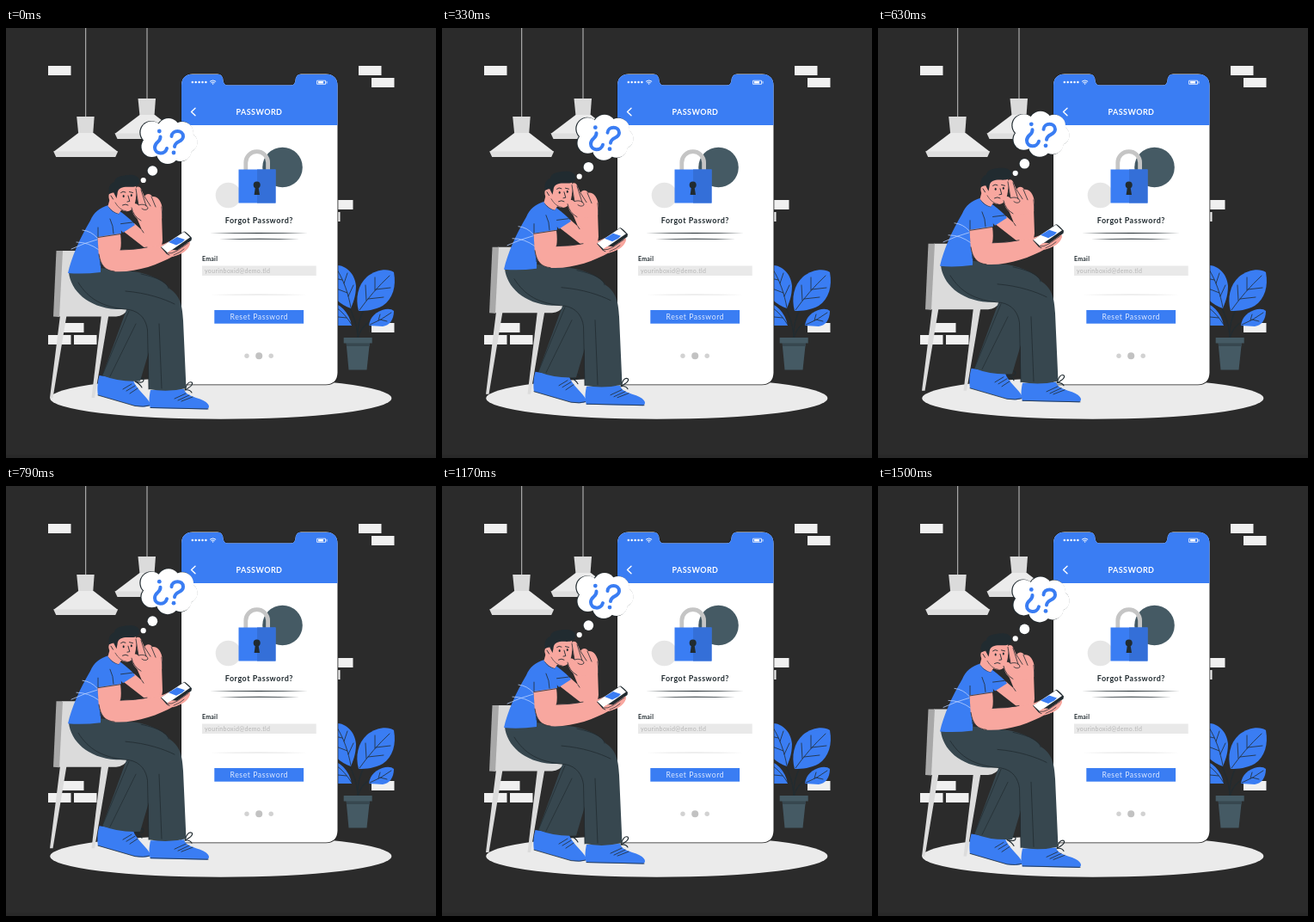
Animation, 500 px wide and 500 px high, one loop 1.54 s. Source, as an HTML page with a canvas:

```html
<!DOCTYPE html>
<html lang="en">
<head>
<meta charset="utf-8">
<title>Forgot password</title>
<style>
html, body { margin: 0; width: 100%; height: 100%; overflow: hidden; background: #2b2b2b; }
canvas { display: block; width: 500px; height: 500px; }
</style>
</head>
<body>
<canvas id="stage"></canvas>
<script>
const LOOP = 1540, LIFT = 10, LEAD = 35;
const BG = '#2b2b2b', BLUE = '#3a7df3', INK = '#212b30', SLATE = '#37474f',
  STEEL = '#455a64', SKIN = '#f8a79f', PALE = '#ebebeb', WHITE = '#fff';

const canvas = document.getElementById('stage');
const ctx = canvas.getContext('2d');
const ratio = window.devicePixelRatio || 1;
canvas.width = canvas.height = 500 * ratio;

function fill(d, color) {
  ctx.fillStyle = color;
  ctx.fill(new Path2D(d));
}
function line(d, color = INK, width = 0.8) {
  ctx.strokeStyle = color;
  ctx.lineWidth = width;
  ctx.stroke(new Path2D(d));
}
function rect(x, y, w, h, color) {
  ctx.fillStyle = color;
  ctx.fillRect(x, y, w, h);
}
function oval(x, y, rx, ry, color, turn = 0) {
  ctx.fillStyle = color;
  ctx.beginPath();
  ctx.ellipse(x, y, rx, ry, turn, 0, 7);
  ctx.fill();
}
const dot = (x, y, r, color) => oval(x, y, r, r, color);

function label(text, x, y, font, color, spacing, align = 'left') {
  ctx.font = font + ' Lato, sans-serif';
  ctx.letterSpacing = spacing + 'px';
  ctx.textAlign = align;
  ctx.fillStyle = color;
  ctx.fillText(text, x, y);
}

function lamp(x, y) {
  ctx.save();
  ctx.translate(x, y);
  line(`M0 ${-y}V0`, '#c4c4c4', 1);
  fill('M-10.5 0H10L8.5 20H-8.5Z', '#dbdbdb');
  fill('M-8.5 19H9L37.5 41H-37.5Z', PALE);
  fill('M-37.5 40.5H37.5L34.5 47H-34.5Z', '#dedede');
  ctx.restore();
}

function room() {
  rect(0, 0, 500, 500, BG);
  rect(0, 496, 500, 4, '#282828');
  const bricks = [[49, 44], [410, 44], [425, 58], [377, 200], [362, 214],
    [425, 343], [64, 343], [49, 357], [79, 357]];
  for (const [x, y] of bricks) rect(x, y, 26.5, 11, '#f0f0f0');
  lamp(164, 82);
  lamp(92.7, 103);
  oval(249.8, 430.5, 198.5, 24.3, PALE);
}

function plant() {
  line('M409 362C409 346 403 330 394 315M409 362C408 345 412 330 424 316M409 362C411 350 418 343 430 338', INK, 1.2);
  fill('M380 276C395 274 406 286 407 300C407 312 403 321 401 326C389 322 378 312 374 300Z', BLUE);
  fill('M410 329C406 314 409 299 420 289C430 281 444 279 451 284C454 300 450 315 438 323C429 328 419 329 410 329Z', BLUE);
  fill('M422 346C423 336 431 329 441 327Q448 326 451 329C451 339 446 346 438 347Z', BLUE);
  fill('M375 318C388 320 399 330 402 346H376Z', BLUE);
  line('M401 325C398 309 393 294 385 281M398 312L404 299M397 308L384 303M393 297L397 285M391 293L382 291');
  line('M411 328C421 314 433 300 446 288M419 317L418 299M429 305L429 290M421 315L439 313M430 304L447 302');
  line('M423 345Q436 340 448 331M433 340L435 333M435 339L443 341M402 345Q394 332 384 325M396 337L386 336');
  fill('M395.5 365H423L419.5 397.5H398.5Z', STEEL);
  rect(396, 366, 27, 4, SLATE);
  rect(392.7, 360, 33, 6.5, STEEL);
}

function taper(x1, x2, y, color) {
  const mid = (x1 + x2) / 2;
  fill(`M${x1} ${y}Q${mid} ${y - 1} ${x2} ${y}Q${mid} ${y + 1} ${x1} ${y}Z`, color);
}

function padlock() {
  dot(321.5, 162, 23.3, STEEL);
  dot(258.5, 194.5, 14.8, '#e6e6e6');
  line('M278.8 168V156.5A12.9 12.9 0 0 1 304.6 156.5V168', '#c5c5c5', 4.8);
  rect(270.5, 164.5, 43, 39, BLUE);
  rect(292, 164.5, 21.5, 39, '#346fd8');
  dot(291.7, 182.5, 4, INK);
  fill('M290 184H293.4L295 194H288.6Z', INK);
}

function screen() {
  const outline = 'M217 53.5H246Q252 53.5 252.5 61Q253 66.5 258 66.5H331Q336 66.5 336.5 61Q337 53.5 343 53.5H372Q385.5 54 385.5 67V401Q385 414 372 414.5H204V67Q204 54 217 53.5Z';
  line(outline, '#1b1b1b', 1.6);
  fill(outline, WHITE);
  ctx.save();
  ctx.clip(new Path2D(outline));
  rect(203, 54, 183, 59, BLUE);
  ctx.restore();

  for (let i = 0; i < 5; i++) dot(216.8 + i * 3.9, 63, 1.25, WHITE);
  line('M237.4 62Q240.6 59.6 243.8 62M238.8 63.6Q240.6 62.2 242.4 63.6', WHITE, 1);
  dot(240.6, 65, 0.7, WHITE);
  line('M362 61.2H371.5V65.3H362ZM373 62.3V64.2', WHITE, 0.8);
  rect(363, 62, 6, 2.5, WHITE);
  line('M220 93.3L215.5 97.5L220 101.8', WHITE, 1.4);
  label('PASSWORD', 294.4, 100.6, 'bold 9px', WHITE, 0.45, 'center');

  padlock();
  label('Forgot Password?', 294.3, 227, 'bold 9px', INK, 0.5, 'center');
  taper(237, 351, 238.5, INK);
  taper(248, 341, 245.3, INK);
  label('Email', 228, 271.3, 'bold 7px', INK, 0.25);
  rect(228, 276.5, 132.7, 11.5, '#e9e9e9');
  label('yourinboxid@demo.tld', 231, 285, '7px', '#b5b5b5', 0.35);
  taper(237, 351, 310, '#dedede');
  rect(242.3, 328, 103.8, 15.7, BLUE);
  label('Reset Password', 294.3, 339, '8.7px', '#dce8ff', 0.55, 'center');
  dot(280, 381.3, 2.7, '#d2d2d2');
  dot(294.2, 381.3, 4, '#c2c2c2');
  dot(308.2, 381.3, 2.7, '#d2d2d2');
}

function chair() {
  fill('M63 334H70.5L54.5 430H51Z', '#dcdcdc');
  fill('M111 333H119.5L103 430H99.5Z', '#dcdcdc');
  fill('M65 259H102V290L143 326Q137 335 128 335.5H60Z', '#dbdbdb');
  fill('M58.5 259H66L62 336L55 335.5Z', '#a8a8a8');
}

function legs() {
  fill('M108.5 404C106 413 106 421 107 427L150 439.5C158 441 168 441 168 437C165 430 151 419 148 410Z', BLUE);
  line('M107 427L150 439.5Q160 441 167 439M136 420L146 414M140 422L150 416M144 425L153 419', INK, 0.8);
  line('M150 411Q158 404 160 409Q160 414 150 411Q156 414 158 418', INK, 1.1);
  fill('M141 325L112 404Q132 412 156 410.5L168 370V325Z', SLATE);
  line('M143 329L112 404M151 344L121 405', INK, 0.7);

  fill('M168 421C166 430 166 437 168 442L234 443.5C239 440 235 434 221 430C212 427 208 424 207 420Z', BLUE);
  line('M168 441.5L235 443M196 431L209 425M200 433L213 427M204 434L217 429', INK, 0.8);
  line('M208 421Q211 410 216 412Q219 415 208 421Q214 420 216 424', INK, 1.1);
  fill('M73 284C75 305 95 325 128 327H143C156 328 162 335 166 348V420Q188 424 209.5 419L206 340C205 321 202 311 190 303C186 295 165 284 145 283L100 278Z', SLATE);
  line('M84 296C96 315 112 325 143 327.5C157 330 163 340 164.5 351L166 420M157 286C180 291 188 297 189 303M196 321C184 315 164 308 139 306M178 344L181 419', INK, 0.8);
}

function farArm() {
  fill('M136 236L149 227L158 235L151 218L181 217L182 247C181 260 173 263 163 257Z', SKIN);
  fill('M128 210C138 217 146 223 150 229L136 238L126 226Z', BLUE);
  line('M131 228L147 226M158 235L160 238', INK, 0.8);
}

function head() {
  fill('M118.5 207L122 194L136 209L131 216Q124 214 118.5 207Z', SKIN);
  fill('M123 184L151 181C152 195 151 205 147 210C141 217 131 212 127 203Z', SKIN);
  oval(123.3, 197, 3.8, 6, SKIN, -0.2);
  fill('M120 193C118 185 122 180 126 179C126 173 136 171 143 171C151 170 157 175 155 180C152 187 144 184 137 185C132 186 130 188 129.5 193L128.5 198L125 191Z', INK);
  oval(136.7, 195.5, 1, 1.5, INK);
  oval(145.8, 194.5, 1, 1.5, INK);
  line('M133.5 191.5Q136 189 139 191M143.5 190.5L147.5 191.5M142 195L143.8 201.5L141 202M135.5 206Q139 204 142 206M122 195L124.5 199', INK, 0.9);
  line('M127 203Q132 212 140 213', INK, 0.6);
}

function hand() {
  fill('M146 209C145 203 151 203 154 206L150.5 189C150 184 155 183 157 187L161 196C163 192 168 192 170 196C176 195 181 201 182 211C182 218 181 223 180 226L156 224C149 220 147 215 146 209Z', SKIN);
  line('M151 187L154 206C159 204 165 206 165 210Q162 213 158 210M157 188L163 207M161 196L168 207M169 196L174 208M146 209Q148 219 157 224M181 208L182 220', INK, 0.8);
}

function torso() {
  fill('M119 206C109 209 102 214 98 224C86 244 76 267 72 285Q90 286.5 110 284L111 250L134 239C134 226 131 216 128 211Q123 212 119 206Z', BLUE);
  line('M119 207Q122 214 131 216M121 222Q125 230 125 239M107 232V244L110 276', INK, 0.8);
  line('M76 257Q91 250 106 246M89 235Q99 236 106 244M82 249Q96 249 108 258', '#b9d1ff', 0.8);
}

function nearArm() {
  fill('M106.5 243L133 239C134 247 134 253 133 258C150 257 170 256 184 251C194 246 205 244 214 249C214 257 206 263 195 265C175 276 150 285 124 283C112 281 108 270 107.5 260Z', SKIN);
  line('M107 243.5L133.5 239.5M108 263C110 276 115 282 126 283M133 258Q150 258 164 255', INK, 0.8);
  fill('M180 255L207 236.5Q209 236 216 244L215.5 247L190 264.5L187 263Z', INK);
  fill('M180.5 254.5L207 237L214 243.5L188 261.5Z', WHITE);
  fill('M189 249L199 243L208 246L205 249L198 252.5Z', BLUE);
  fill('M187 262Q192 256 200 259L212 249Q216 250 211 256Q205 263 194 266Z', SKIN);
  line('M187 262Q193 263 199 259L212 250M195 264Q203 261 207 257', INK, 0.7);
}

function bubble() {
  const lobes = [[169.5, 121.5, 13], [189, 118, 13], [205, 122, 13], [211.5, 133, 11.3],
    [203, 142, 13], [188, 145, 13], [169.5, 138, 12], [188, 131, 20]];
  for (const [x, y, r] of lobes) dot(x - 0.8, y, r + 0.4, INK);
  for (const [x, y, r] of lobes) dot(x, y, r, WHITE);
  dot(170, 166, 6.2, INK);
  dot(170.4, 166, 5.8, WHITE);
  dot(159.7, 177, 3.1, WHITE);
  line('M179.5 126.5C180 133 173 132 173 139C173 147 185 148 187 140', BLUE, 4);
  dot(178.3, 120, 2.4, BLUE);
  line('M192.5 126C193 118 206 118 206 126C206 133 196.5 131 196 138', BLUE, 4);
  dot(195, 145, 2.4, BLUE);
}

function draw(now) {
  const phase = ((now + LEAD) % LOOP) / LOOP;
  const rise = LIFT * (1 - Math.abs(1 - 2 * phase));
  ctx.setTransform(ratio, 0, 0, ratio, 0, 0);
  ctx.lineCap = ctx.lineJoin = 'round';
  room();
  plant();
  screen();
  ctx.translate(0, 0.45 - rise);
  chair();
  legs();
  farArm();
  torso();
  head();
  hand();
  nearArm();
  bubble();
}

let start;
function tick(now) {
  start ??= now;
  draw(now - start);
  requestAnimationFrame(tick);
}
draw(0);
requestAnimationFrame(tick);
</script>
</body>
</html>
```
